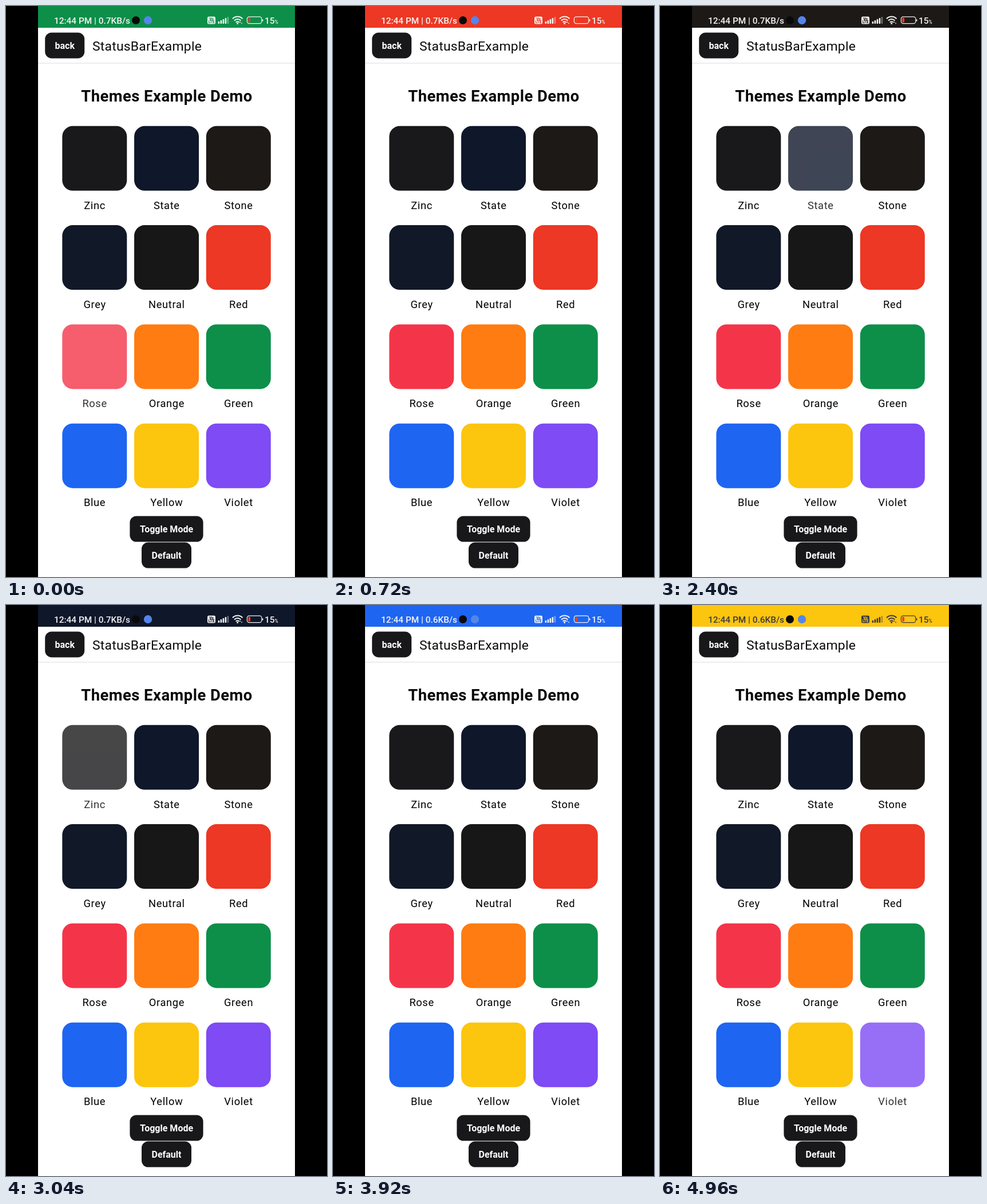
Animation, 561 px wide and 998 px high, one loop 5.04 s. Source, as an HTML page:

```html
<!DOCTYPE html>
<html lang="en">
<head>
<meta charset="utf-8">
<title>Themes Example Demo</title>
<style>
  html, body { margin: 0; width: 100%; height: 100%; overflow: hidden; background: #000; }
  svg { display: block; width: 100vw; height: 100vh; font-family: Roboto, sans-serif; }
  .label { font-size: 18.3px; letter-spacing: .65px; text-anchor: middle; }
  .button rect { fill: #18181b; }
  .button text { fill: #fff; font-size: 16px; font-weight: 700; text-anchor: middle; }
  #status { --ink: #f4f4f4; }
  #status text { font-size: 15.4px; font-weight: 500; }
  .ink { fill: var(--ink); }
  .line { fill: none; stroke: var(--ink); }
  #status .cut { fill: var(--bar); font-size: 6.4px; font-weight: 900; text-anchor: middle; }
</style>
</head>
<body>
<svg viewBox="0 0 561 998">
  <rect width="561" height="998"/>
  <rect x="56" width="449" height="998" fill="#fff"/>
  <rect x="56" y="99.3" width="449" height="1.2" fill="#e2e2e4"/>

  <g id="status">
    <rect x="56" width="449" height="38" fill="var(--bar)"/>
    <text class="ink" x="84" y="30.5">12:44 PM | <tspan id="speed">0.7</tspan>KB/s</text>
    <circle cx="227" cy="25" r="7" fill="#0a0a0a"/>
    <circle cx="248" cy="25" r="7.2" fill="#5485ea"/>
    <rect class="ink" x="352" y="18.5" width="14" height="13" rx="2.5"/>
    <text class="cut" x="359" y="24.6">Vo</text>
    <text class="cut" x="359" y="30.4">LTE</text>
    <g id="signal"></g>
    <g class="line" stroke-width="2">
      <path d="M396 22.3a12 12 0 0 1 17.4 0M399 25.6a7.6 7.6 0 0 1 11.4 0M401.7 28.6a4 4 0 0 1 6 0"/>
    </g>
    <circle class="ink" cx="404.7" cy="30.6" r="1.5"/>
    <path class="ink" d="M408 29l1.3-2 1.3 2zM410.7 29.6h2.6l-1.3 2z"/>
    <rect class="line" x="421.4" y="18.9" width="25.4" height="11.8" rx="3.6" stroke-width="1.2"/>
    <path class="ink" d="M447.6 23a2 2 0 0 1 0 4z"/>
    <rect x="423.3" y="20.8" width="3.8" height="8" rx="1.3" fill="#f0402c"/>
    <text class="ink" x="452" y="30.5">15<tspan font-size="8.4">%</tspan></text>
  </g>

  <text x="151" y="78" font-size="22.86" letter-spacing=".25" fill="#0a0a0a">StatusBarExample</text>
  <text x="281" y="167.3" font-size="27.4" font-weight="700" letter-spacing=".48" text-anchor="middle" fill="#09090b">Themes Example Demo</text>
  <g id="tiles"></g>
  <g id="buttons"></g>
</svg>
<script>
const THEMES = [
  ['Zinc', '#19191b'], ['State', '#0f172a'], ['Stone', '#1c1917'],
  ['Grey', '#111827'], ['Neutral', '#171717'], ['Red', '#ec3824'],
  ['Rose', '#f43549'], ['Orange', '#ff7c12'], ['Green', '#0d8f49'],
  ['Blue', '#1e65f2'], ['Yellow', '#fcc50e'], ['Violet', '#7e4bf4'],
];
const LOOP = 5040, STEP = 80, PRESSED = 0.8;

// Each tap: theme, finger down, release (status bar changes), fully restored.
const TAPS = [
  ['Rose', 0, 80, 160],
  ['Red', 480, 560, 720],
  ['Stone', 1520, 1600, 1760],
  ['State', 2400, 2560, 2640],
  ['Zinc', 3040, 3120, 3280],
  ['Blue', 3680, 3840, 3920],
  ['Yellow', 4160, 4320, 4560],
  ['Violet', 4960, LOOP, LOOP],
];
const colors = Object.fromEntries(THEMES);
const byId = id => document.getElementById(id);

function add(parent, tag, attrs, text = '') {
  const node = document.createElementNS('http://www.w3.org/2000/svg', tag);
  for (const key in attrs) node.setAttribute(key, attrs[key]);
  node.textContent = text;
  return parent.appendChild(node);
}

const tiles = {};
THEMES.forEach(([name, fill], i) => {
  const x = 98.3 + (i % 3) * 125.75;
  const y = 209.8 + Math.floor(i / 3) * 173.3;
  const tile = tiles[name] = add(byId('tiles'), 'g', {});
  add(tile, 'rect', { x, y, width: 113, height: 113, rx: 18.3, fill });
  add(tile, 'text', { class: 'label', x: x + 56.8, y: y + 144.7 }, name);
});

function addButton(x, y, width, label) {
  const button = add(byId('buttons'), 'g', { class: 'button' });
  add(button, 'rect', { x, y, width, height: 45, rx: 11.5 });
  add(button, 'text', { x: x + width / 2, y: y + 28.4 }, label);
}
addButton(68.2, 46.4, 69, 'back');
addButton(216.4, 891.5, 128.2, 'Toggle Mode');
addButton(237, 937.5, 87, 'Default');

for (let i = 0; i < 5; i++) {
  const height = 4 + i * 2;
  add(byId('signal'), 'rect', {
    class: 'ink', x: 370.6 + i * 4, y: 31 - height, width: 2.6, height, rx: 0.8,
    opacity: i < 4 ? 1 : 0.4,
  });
}

function render(time) {
  const t = Math.floor((time % LOOP) / STEP) * STEP;
  let current = 'Green';
  for (const [name, down, release, end] of TAPS) {
    let opacity = 1;
    if (t >= down && t < end) {
      const fade = Math.max(0, (t - release + STEP) / (end - release + STEP));
      opacity = t < release ? PRESSED : PRESSED + (1 - PRESSED) * fade;
    }
    tiles[name].setAttribute('opacity', opacity);
    if (t >= release) current = name;
  }
  const style = byId('status').style;
  style.setProperty('--bar', colors[current]);
  style.setProperty('--ink', current === 'Yellow' ? '#3b3a44' : '#f4f4f4');
  byId('speed').textContent = t < 3840 ? '0.7' : '0.6';
}

const start = performance.now();
function tick() {
  render(performance.now() - start);
  requestAnimationFrame(tick);
}
tick();
</script>
</body>
</html>
```
